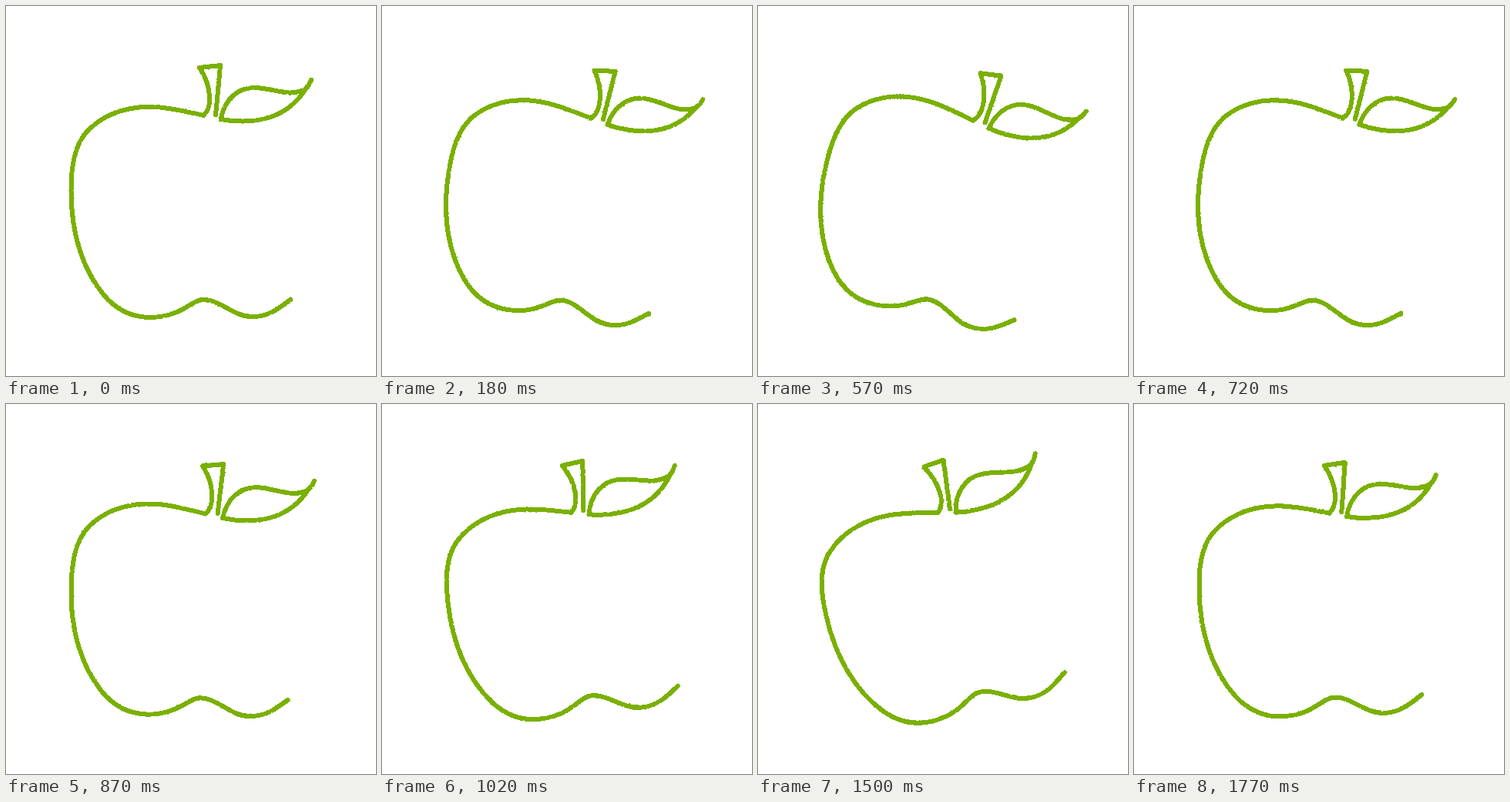
Recreate the animation shown at these times as an HTML page. Size 480 px wide and 480 px high, loop 1.8 s.

```html
<!DOCTYPE html>
<html lang="en">
<head>
<meta charset="utf-8">
<title>Swinging apple</title>
<style>
  html, body { margin: 0; width: 100%; height: 100%; overflow: hidden; background: #fff; }
  svg { display: block; width: 100vw; height: 100vh; }
  /* The timing curve approximates a sine; the delay starts it upright. */
  .swing {
    transform-origin: 240px 240px;
    animation: swing 900ms cubic-bezier(.3642, 0, .6358, 1) -450ms infinite alternate;
  }
  @keyframes swing {
    from { transform: rotate(-15deg); }
    to { transform: rotate(15deg); }
  }
  .lines {
    fill: none;
    stroke: #7ab000;
    stroke-width: 6;
    stroke-linecap: round;
    stroke-linejoin: round;
  }
</style>
</head>
<body>
<svg viewBox="0 0 480 480">
  <defs>
    <!-- slightly ragged, hard edges -->
    <filter id="rough" filterUnits="userSpaceOnUse" x="0" y="0" width="480" height="480" color-interpolation-filters="sRGB">
      <feTurbulence type="fractalNoise" baseFrequency=".25" numOctaves="2" seed="4" result="noise"/>
      <feDisplacementMap in="SourceGraphic" in2="noise" scale="2" xChannelSelector="R" yChannelSelector="G"/>
      <feComponentTransfer>
        <feFuncA type="discrete" tableValues="0 1"/>
      </feComponentTransfer>
    </filter>
  </defs>
  <g filter="url(#rough)">
    <g class="swing lines">
      <!-- body -->
      <path d="M256 142C232 137 212 131 185 131C150 131 122 144 104 164C88 183 84.5 210 84.5 240
               C84.5 300 102 345 127 375C144 395 164 404 187 404C228 404 240 381 256 381
               C279 381 294 403 320 403C340 403 352 394 369.5 380.5"/>
      <!-- stem -->
      <path d="M256 142C267 133 268 106 251 80L278 77L272 141"/>
      <!-- leaf -->
      <path d="M396 95.5C394.5 99 393 104 388 108C365 119 347 106 322 106C302 106 284 119 278.5 147
               C325 155 367 145 390 105"/>
    </g>
  </g>
</svg>
</body>
</html>
```
